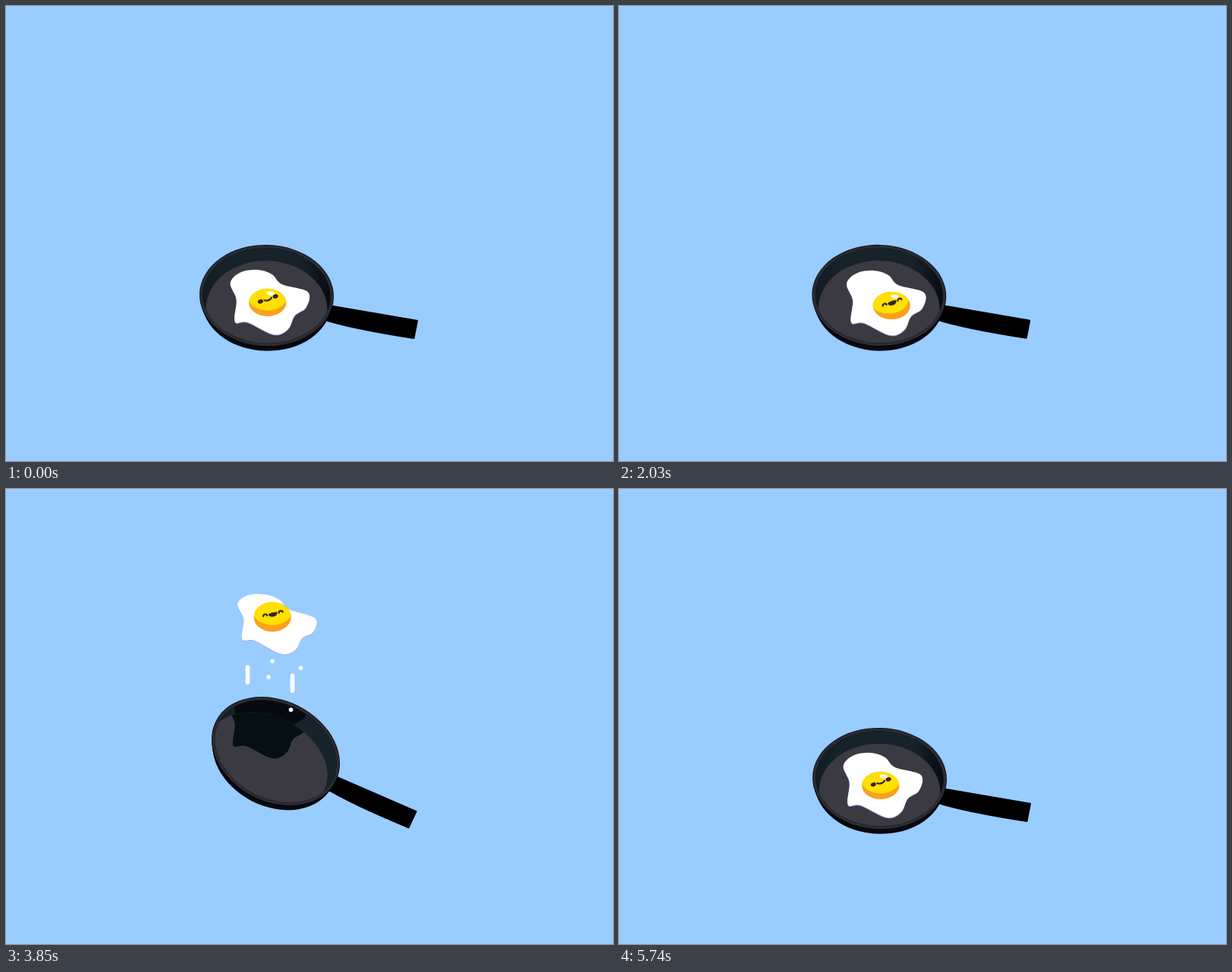
Write an HTML page with a canvas that moves like this. It is 800 px wide and 600 px high and loops after 5.81 s.

```html
<!DOCTYPE html>
<html lang="en">
<head>
<meta charset="utf-8">
<title>Fried egg</title>
<style>
  html, body { margin: 0; width: 100%; height: 100%; overflow: hidden; background: #9cf; }
  canvas { display: block; width: 800px; height: 600px; }
</style>
</head>
<body>
<canvas id="stage" width="800" height="600"></canvas>
<script>
const ctx = document.getElementById('stage').getContext('2d');
const LOOP = 5810, STEP = 70, SLOPE = .21;
const THROW = 3290, APEX = 4340, LAND = 4745;
const clamp = v => Math.max(0, Math.min(1, v));
const ramp = (t, from, to) => clamp((t - from) / (to - from));
const ease = (t, from, to) => { const u = ramp(t, from, to); return u * u * (3 - 2 * u); };

// Half-cosine swings from one turning point [time, value] to the next.
const swing = (...turns) => t => turns.reduce((value, [end, next], i) => {
  if (i === 0) return next;
  const [begin, last] = turns[i - 1];
  return value + (next - last) * (1 - Math.cos(Math.PI * ramp(t, begin, end))) / 2;
}, 0);

const slide = swing([0, 0], [650, -31], [1485, 53], [2455, -37], [3200, 7], [3500, 0]);
const crouch = swing([2590, 0], [3150, 49], [3500, 0]);
const tilt = t => ease(t, 3150, 3560) * (1 - ease(t, 4480, 4815));
const rising = t => ease(t, THROW, 3600) * (1 - ease(t, 4270, 4690));
const falling = t => ease(t, 4270, 4690) * (1 - ease(t, 4690, 4830));

// The pan gives way when the egg lands, then springs back and settles.
function rebound(t) {
  const s = Math.max(0, t - LAND);
  return 30 * Math.exp(-s / 400) * Math.sin(Math.PI * s / 270) * (1 - ease(t, 5300, 5600));
}

// Egg height above the pan: eases up to the apex, then drops faster and faster.
function height(t) {
  return 238 * (t < APEX
    ? 1 - (1 - ramp(t, THROW, APEX)) ** 2
    : 1 - ramp(t, APEX, LAND) ** 2.5);
}

// Outline of the egg white around the yolk.
const EGG = [[-49, -26], [-35, -40], [-12, -43], [6, -37], [19, -24], [53, -14], [51, 6],
  [36, 17], [27, 35], [8, 42], [-26, 26], [-43, 25], [-41, -4]];

function ellipse(x, y, rx, ry, angle = 0, fill) {
  ctx.beginPath();
  ctx.ellipse(x, y, rx, ry, angle, 0, 2 * Math.PI);
  if (fill) { ctx.fillStyle = fill; ctx.fill(); }
}

function blob(points, dx, dy, fill) {
  const p = i => points.at(i % points.length);
  const bend = (i, axis) => (p(i + 1)[axis] - p(i - 1)[axis]) / 6;
  ctx.save();
  ctx.translate(dx, dy);
  ctx.beginPath();
  ctx.moveTo(...p(0));
  points.forEach(([x, y], i) => {
    const [nx, ny] = p(i + 1);
    ctx.bezierCurveTo(x + bend(i, 0), y + bend(i, 1),
      nx - bend(i + 1, 0), ny - bend(i + 1, 1), nx, ny);
  });
  ctx.fillStyle = fill;
  ctx.fill();
  ctx.restore();
}

function capsule(x, y, length, width, color) {
  ctx.beginPath();
  ctx.moveTo(x, y);
  ctx.lineTo(x, y + length + .01);
  ctx.lineCap = 'round';
  ctx.lineWidth = width;
  ctx.strokeStyle = color;
  ctx.stroke();
}

// Draws around the middle of the rim; k is 0 for level and 1 for fully tilted.
function drawPan(x, y, k, lift) {
  const turn = .24 * k, angle = .03 + .44 * k;
  ctx.save();
  ctx.translate(x, y);

  ctx.save();
  ctx.rotate(turn);
  ctx.beginPath();
  ctx.moveTo(76, 12);
  ctx.lineTo(74, 31);
  ctx.quadraticCurveTo(110, 43, 194, 56);
  ctx.lineTo(198.5, 33);
  ctx.closePath();
  ctx.fillStyle = ctx.strokeStyle = '#000';
  ctx.lineWidth = 2;
  ctx.lineJoin = 'round';
  ctx.fill();
  ctx.stroke();
  ctx.restore();

  for (let depth = 9; depth >= 0; depth -= 3)
    ellipse(-depth * Math.sin(turn), depth * Math.cos(turn),
      88.5 - depth * .4, 67 - depth * .35, angle, '#07080c');
  ellipse(0, 0, 87.7, 66.2, angle, '#2b2c34');

  ellipse(0, 0, 84, 62.5, angle);
  ctx.lineWidth = 1;
  ctx.strokeStyle = '#11141b';
  ctx.stroke();
  ctx.clip();
  const wall = ctx.createLinearGradient(-85, 0, 85, 0);
  wall.addColorStop(0, '#111b21');
  wall.addColorStop(.2, '#17232a');
  wall.addColorStop(.75, '#17232a');
  wall.addColorStop(1, k > .5 ? '#17232a' : '#070b0f');
  ctx.fillStyle = wall;
  ctx.fill();

  const shadowX = -1 - 12 * k, shadowY = 9 - lift * .225;
  if (lift > 0) blob(EGG, shadowX, shadowY - 18, '#070a10');
  ellipse(-18 * Math.sin(.7 * k), 18 * Math.cos(.7 * k), 80 + 4 * k, 64 - 4 * k, angle, '#3b3a43');
  if (lift > 0) {
    ctx.clip();
    blob(EGG, shadowX, shadowY, '#041011');
  }
  ctx.restore();
}

function drawFace(laughing, angle) {
  const ink = '#35222f';
  ctx.save();
  ctx.translate(.5, -4.7);
  ctx.rotate(angle);
  ctx.strokeStyle = ctx.fillStyle = ink;
  ctx.lineCap = 'round';
  ctx.lineWidth = 2.2;
  for (const x of [-10.5, 10.5]) {
    if (laughing) {
      ctx.beginPath();
      ctx.ellipse(x, 1, 2.6, 2.2, 0, Math.PI, 2 * Math.PI);
      ctx.stroke();
    } else ellipse(x, 0, 3.6, 2.7, 0, ink);
  }
  ctx.beginPath();
  if (laughing) {
    ctx.moveTo(-6, -.5);
    ctx.quadraticCurveTo(0, -2.5, 6, -.5);
    ctx.bezierCurveTo(6, 6, -6, 6, -6, -.5);
    ctx.fill();
  } else {
    ctx.moveTo(-5, 0);
    ctx.quadraticCurveTo(0, 4, 5, 0);
    ctx.stroke();
  }
  ctx.restore();
}

function drawYolk(x, y, slosh, up, laughing) {
  ctx.save();
  ctx.translate(x, y);
  ellipse(0, 0, 24.6, 18.2 + up * 1.3, 0, '#f9a11f');
  ctx.save();
  ctx.clip();
  ellipse(-slosh * .25, -8, 26, 18.5, 0, '#ffe000');
  ctx.restore();
  if (up < .5) ellipse(4, -12, 5, 2.6, .1, '#fff');
  drawFace(laughing, -.33 + .11 * up);
  ctx.restore();
}

function drawEgg(t, x, y, up, down) {
  // Thrown, the white sags and leans; dropping, it is dragged upwards.
  const outline = EGG.map(([px, py]) => [
    px + 3 * up - 3 * down,
    py + up * (10 - .1 * py + .08 * px) + down * (.06 * py - 6.5)
  ]);
  const whiteLag = slide(t - 35) - slide(t), yolkLag = slide(t - 105) - slide(t);
  const wx = x + whiteLag, wy = y + whiteLag * SLOPE;
  blob(outline, wx, wy + 1, '#a3aee4');
  blob(outline, wx, wy, '#fff');
  drawYolk(x + yolkLag, y + yolkLag * .28, yolkLag, up, t >= 280 && t < 5460);
}

function drawRisingDrops(t) {
  if (t < 3430 || t > 4300) return;
  const arc = .0012 * ((t - 3880) ** 2 - 900), stretch = 20 * ramp(t, 4050, 3850);
  const drop = (x, y, length = 0) => y + arc < 345 && capsule(x, y + arc, length, 5.7, '#fff');
  drop(318.5, 235, stretch);
  drop(377.5, 246, stretch);
  drop(351, 227);
  drop(388.5, 236);
  drop(346, 248);
  drop(375.5, 291);
}

function drawFallingDrops(t) {
  if (t < 4550 || t > 4800) return;
  const fall = .9 * (t - 4690);
  capsule(302.5, 250 + fall, 0, 9, '#fff');
  capsule(380.5, 273.5 + fall, 0, 9, '#fff');
  capsule(344.5, 243 + fall, 32, 8, '#ffdf00');
}

function draw(t) {
  ctx.fillStyle = '#9cf';
  ctx.fillRect(0, 0, 800, 600);

  const k = tilt(t), lift = height(t), up = rising(t), down = falling(t);
  const panX = 343.5 + slide(t) + 12 * k * k;
  const panY = 382 + slide(t) * SLOPE + crouch(t) + rebound(t) - 36 * k;

  drawPan(panX, panY, k, lift);
  drawRisingDrops(t);
  drawEgg(t, panX + 1.2 - 5.5 * up + 4 * down, panY + 9 - lift, up, down);
  drawFallingDrops(t);
}

const start = performance.now();
function tick() {
  const t = Math.max(0, performance.now() - start) % LOOP;
  draw(t < 2 * STEP ? 0 : Math.floor(t / STEP) * STEP);
  requestAnimationFrame(tick);
}
tick();
</script>
</body>
</html>
```
